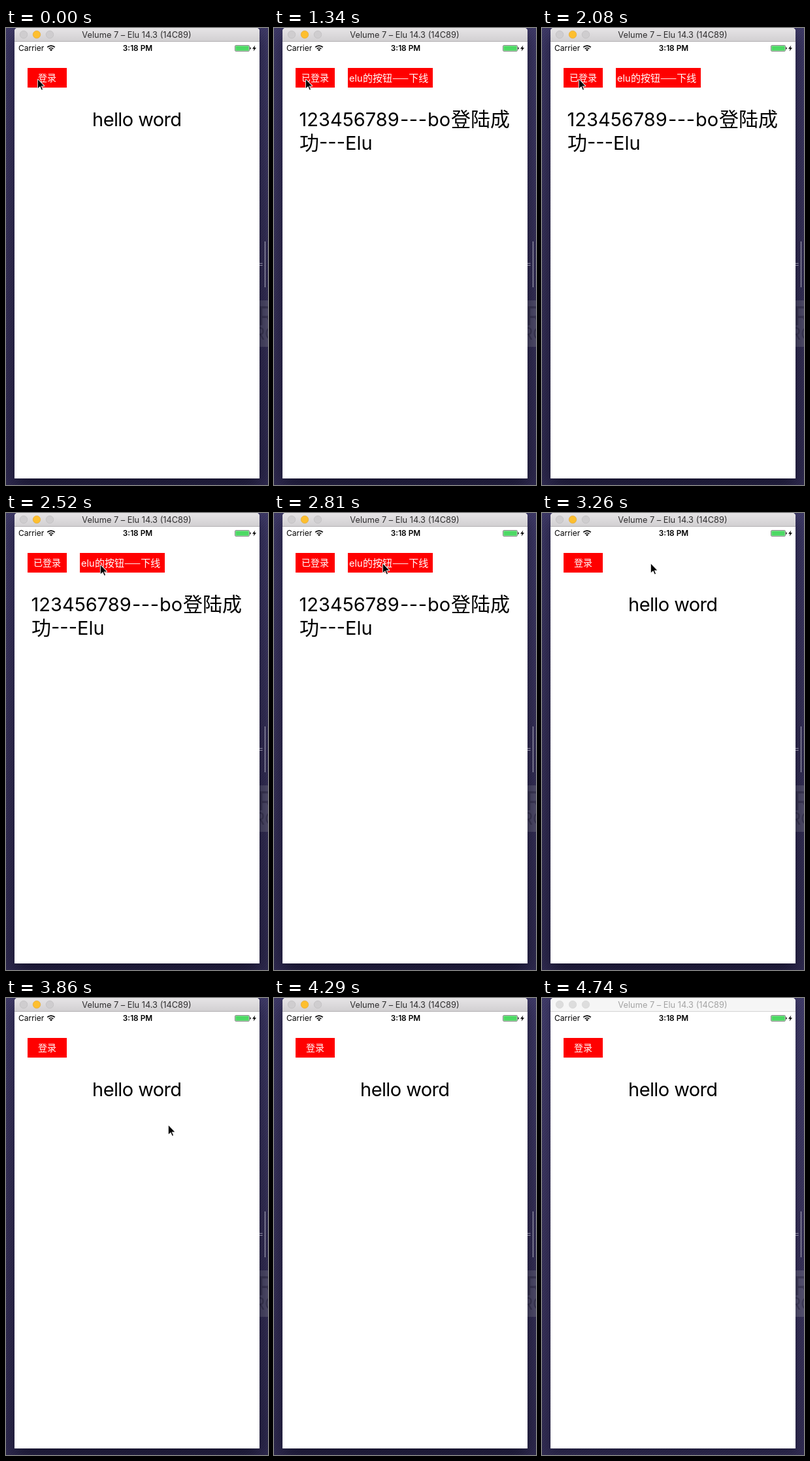
Recreate the animation shown at these times as an HTML page with a canvas. Size 401 px wide and 698 px high, loop 4760 ms.

```html
<!DOCTYPE html>
<html lang="zh">
<head>
<meta charset="utf-8">
<title>Login demo</title>
<style>
  html, body { margin: 0; width: 100%; height: 100%; overflow: hidden; background: #302b50; }
  canvas { display: block; width: 401px; height: 698px; }
</style>
</head>
<body>
<canvas id="stage"></canvas>
<script>
const W = 401, H = 698, LOOP = 4760;
const LOGIN = 1340, PRESS = 3110, LOGOUT = 3260, LEAVE = 3860, BLUR = 4740;
const STEP = 145; // the pointer is sampled at this interval
const LATIN = 'Inter, "Noto Sans CJK SC", "Noto Sans CJK", sans-serif';
const HAN = '"Noto Sans CJK SC", "Noto Sans CJK", sans-serif';
const canvas = document.getElementById('stage');
const ctx = canvas.getContext('2d');
const ratio = window.devicePixelRatio || 1;
canvas.width = W * ratio;
canvas.height = H * ratio;

const mix = (a, b, u) => a + (b - a) * u;
const clamp = u => Math.min(1, Math.max(0, u));

function rect(x, y, w, h, color) {
  ctx.fillStyle = color;
  ctx.fillRect(x, y, w, h);
}

function verticalFade(height, ...colors) {
  const g = ctx.createLinearGradient(0, 0, 0, height);
  colors.forEach((c, i) => g.addColorStop(i / (colors.length - 1), c));
  return g;
}

function text(str, x, y, size, color, opt = {}) {
  ctx.font = `${opt.weight || 400} ${size}px ${opt.family || LATIN}`;
  ctx.letterSpacing = (opt.track || 0) + 'px';
  ctx.textAlign = opt.align || 'left';
  ctx.fillStyle = color;
  ctx.fillText(str, x, y);
}

function windowPath() {
  ctx.beginPath();
  ctx.roundRect(13, 0, 375, 688, [5, 5, 0, 0]);
}

function drawDesktop() {
  rect(0, 0, W, H, verticalFade(H, '#403b68', '#383259', '#302b50'));

  ctx.strokeStyle = 'rgba(10,8,35,0.12)';
  ctx.lineWidth = 1;
  ctx.beginPath();
  for (let y = 0; y < H + W; y += 4) {
    ctx.moveTo(0, y);
    ctx.lineTo(W, y - W);
  }
  ctx.stroke();

  rect(388, 416, 13, 71, '#514d6b');
  text('R', 385, 454, 40, '#3d3955');
  text('RO', 380, 476, 25, '#3d3955');
}

function drawShadow(active) {
  ctx.save();
  ctx.shadowColor = `rgba(0,0,15,${active ? 0.6 : 0.38})`;
  ctx.shadowBlur = (active ? 26 : 13) * ratio;
  ctx.shadowOffsetY = (active ? 10 : 4) * ratio;
  windowPath();
  ctx.fillStyle = '#fff';
  ctx.fill();
  ctx.restore();

  text('=', 386.5, 364, 11, '#9a97ae');
  rect(396, 326, 1, 70, '#aaa8ba');
}

function drawTitleBar(active) {
  rect(13, 0, 375, 20, active ? verticalFade(20, '#e6e4e6', '#d2d0d2') : '#f6f6f6');
  rect(13, 20, 375, 1, active ? '#b3b1b3' : '#d4d4d4');

  for (let i = 0; i < 3; i++) {
    const yellow = active && i === 1;
    ctx.beginPath();
    ctx.arc(27 + 20 * i, 10, 5.75, 0, Math.PI * 2);
    ctx.fillStyle = yellow ? '#fdbf2f' : active ? '#cfcdcf' : '#ddd';
    ctx.fill();
    ctx.strokeStyle = yellow ? '#e2a32b' : active ? '#bbb9bb' : '#d2d2d2';
    ctx.lineWidth = 0.6;
    ctx.stroke();
  }
  text('Velume 7 – Elu 14.3 (14C89)', 200, 15, 12.8,
    active ? '#2e2d2e' : '#a3a3a3', { align: 'center' });
}

function drawWifi() {
  const wedge = r => ctx.arc(69, 35.2, r, -Math.PI * 0.75, -Math.PI * 0.25);
  ctx.strokeStyle = ctx.fillStyle = '#000';
  ctx.lineWidth = 1.7;
  for (const r of [4.7, 8.1]) {
    ctx.beginPath();
    wedge(r);
    ctx.stroke();
  }
  ctx.beginPath();
  ctx.moveTo(69, 35.2);
  wedge(2.8);
  ctx.fill();
}

function drawBattery() {
  ctx.beginPath();
  ctx.roundRect(350.5, 26.5, 22, 9, 1.5);
  ctx.strokeStyle = '#555';
  ctx.lineWidth = 0.7;
  ctx.stroke();
  rect(351.3, 27.3, 20.4, 7.4, '#4cd964');
  ctx.beginPath();
  ctx.arc(373.3, 31, 1.7, -Math.PI / 2, Math.PI / 2);
  ctx.fillStyle = '#222';
  ctx.fill();

  // Bolt: one half, then the same half turned around
  ctx.beginPath();
  for (const s of [1, -1]) {
    ctx.lineTo(380 + 1.3 * s, 31 - 4.5 * s);
    ctx.lineTo(380 - 3 * s, 31 + 0.7 * s);
    ctx.lineTo(380 - 0.3 * s, 31 + 0.7 * s);
  }
  ctx.fillStyle = '#000';
  ctx.fill();
}

function drawStatusBar() {
  text('Carrier', 19, 35.4, 12, '#000');
  text('3:18 PM', 201.5, 35.4, 11.8, '#000', { align: 'center', weight: 600 });
  drawWifi();
  drawBattery();
}

function drawLoginButton(label) {
  rect(33, 61, 60, 30, '#f00');
  text(label, 63, 81.3, 14, '#fff', { align: 'center', family: HAN });
}

function drawLoggedOut() {
  drawLoginButton('登录');
  text('hello word', 200.3, 150, 29, '#000', { align: 'center', track: -0.6 });
}

function drawLoggedIn(pressed) {
  drawLoginButton('已登录');

  const color = pressed ? 'rgba(255,255,255,0.2)' : '#fff';
  rect(113, 61, 130, 30, '#f00');
  text('elu', 115, 81.5, 14.5, color);
  text('的按钮——下线', 136, 81.5, 15, color, { family: HAN });

  text('123456789', 38.5, 150, 29, '#000');
  text('---', 193, 150, 29, '#000', { track: 0.5 });
  text('bo', 235, 150, 29, '#000');
  text('登陆成', 271, 150, 30, '#000', { family: HAN });
  text('功', 39, 186, 30, '#000', { family: HAN });
  text('---Elu', 69, 186, 29, '#000');
}

// Speeds up towards the second button, then glides evenly along it
function approach(t) {
  const n = Math.floor((t - 1940) / STEP) + 1;
  const rush = clamp(n / 3) ** 2;
  const glide = clamp((n - 3) / 4);
  return [
    mix(mix(48, 121, rush), 166, glide),
    mix(mix(77, 80, rush), 76, glide)
  ].map(Math.round);
}

// Swings down and out through the bottom of the window
function leave(t) {
  const path = [[248, 193], [338, 456], [346, 684]];
  return path[Math.floor((t - LEAVE) / 143)];
}

function drawPointer(t) {
  const tip = t < LEAVE ? approach(t) : leave(t);
  if (!tip) return;
  ctx.save();
  ctx.translate(...tip);
  ctx.beginPath();
  ctx.moveTo(0.8, 1.8);
  ctx.lineTo(0.8, 15);
  ctx.lineTo(4.2, 12);
  ctx.lineTo(6.6, 17.4);
  ctx.lineTo(8, 16.8);
  ctx.lineTo(5.7, 11.5);
  ctx.lineTo(10.2, 11.5);
  ctx.closePath();
  ctx.strokeStyle = '#fff';
  ctx.lineWidth = 1.8;
  ctx.lineJoin = 'round';
  ctx.stroke();
  ctx.fillStyle = '#000';
  ctx.fill();
  ctx.restore();
}

function draw(t) {
  const active = t < BLUR;
  ctx.setTransform(ratio, 0, 0, ratio, 0, 0);
  drawDesktop();
  drawShadow(active);

  ctx.save();
  windowPath();
  ctx.clip();
  rect(13, 0, 375, 688, '#fff');
  drawTitleBar(active);
  drawStatusBar();
  if (t >= LOGIN && t < LOGOUT) drawLoggedIn(t >= PRESS);
  else drawLoggedOut();
  ctx.restore();

  drawPointer(t);
}

const start = performance.now();
function tick() {
  draw((performance.now() - start) % LOOP);
  requestAnimationFrame(tick);
}
tick();
</script>
</body>
</html>
```
